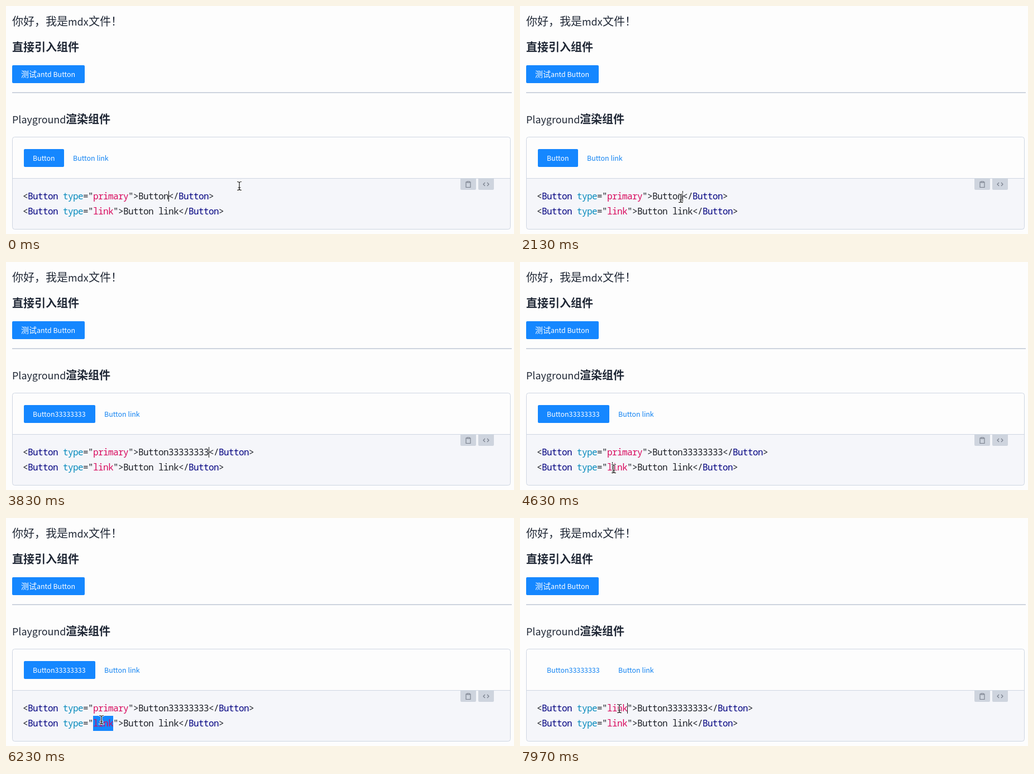
Animation of 910 by 408 pixels, one loop 8000 ms. Source, as an HTML page:

```html
<!DOCTYPE html>
<html lang="zh-CN">
<head>
<meta charset="utf-8">
<title>Playground</title>
<style>
  html, body { margin: 0; width: 100%; height: 100%; overflow: hidden; background: #fdfdfd; }
  svg { display: block; width: 910px; height: 408px; }
  text { font-family: "Noto Sans CJK SC", "Noto Sans CJK JP", "Noto Sans CJK", "Noto Sans", sans-serif; fill: #1f2735; white-space: pre; }
  .h { font-size: 20px; }
  .h .latin { font-size: 17.9px; }
  .b { font-weight: 700; }
  .s { font-size: 14px; font-weight: 500; }
  .s .latin, .s.latin { font-size: 12.4px; }
  .white { fill: #fff; }
  .link { fill: #1283f2; }
  .blue { fill: #1587ff; }
  .code, .code tspan { font: 16px "Noto Sans Mono", "Liberation Mono", monospace; letter-spacing: -.6px; }
  .code { fill: #1c1f26; }
  .tag { fill: #000080; }
  .attr { fill: #078bbd; }
  .str { fill: #d8085c; }
  .line { fill: none; stroke: #ced6e2; }
  .tool { fill: #ced4de; }
  .icon { fill: none; stroke: #747b88; stroke-width: 1.1; }
  .beam { fill: none; stroke-linecap: round; }
</style>
</head>
<body>
<svg viewBox="0 0 910 408">
  <defs>
    <path id="beam" d="M-3.5-7.5Q0-7.5 0-5.5Q0-7.5 3.5-7.5M0-5.5V5.5M-3.5 7.5Q0 7.5 0 5.5Q0 7.5 3.5 7.5M-2 3H2"/>
  </defs>
  <text class="h" y="35"><tspan x="11">你好，我是</tspan><tspan class="latin" x="111">mdx</tspan><tspan x="148">文件！</tspan></text>
  <text class="h b" x="11" y="81">直接引入组件</text>
  <rect class="blue" x="11" y="106" width="130" height="32" rx="2"/>
  <text class="s white" y="127"><tspan x="27">测试</tspan><tspan class="latin" x="55">antd Button</tspan></text>
  <rect x="11" y="154" width="895" height="2" fill="#ced4de"/>
  <text class="h" y="210"><tspan class="latin" x="11">Playground</tspan><tspan class="b" x="107">渲染组件</tspan></text>

  <path d="M12 308H903V396a4 4 0 0 1-4 4H16a4 4 0 0 1-4-4Z" fill="#f5f6fa"/>
  <rect class="line" x="11.5" y="234.5" width="892" height="165" rx="4"/>
  <path class="line" d="M12 308.5H903"/>
  <rect class="blue" id="button" x="32" y="256" height="32" rx="2"/>
  <text id="label" x="48" y="277"></text>
  <text class="s latin link" id="second" y="277">Button link</text>

  <path class="tool" d="M814 309h28v18a2 2 0 0 1-2 2h-24a2 2 0 0 1-2-2ZM846 309h28v18a2 2 0 0 1-2 2h-24a2 2 0 0 1-2-2Z"/>
  <path class="icon" d="M826 315h-2v9.5h8v-9.5h-2M826 314h4v2h-4Z"/>
  <path class="icon" d="M858 316l-3 3 3 3M862 316l3 3-3 3"/>

  <rect class="blue" id="selection" x="156" height="27"/>
  <text class="code" id="first-line" y="346"></text>
  <text class="code" id="second-line" y="373"></text>
  <rect id="caret" width="1" height="19" fill="#111"/>
  <g id="mouse">
    <circle id="press" r="11" fill="#c4302c" fill-opacity=".85"/>
    <use class="beam" href="#beam" stroke="#fff" stroke-width="3"/>
    <use class="beam" href="#beam" stroke="#111" stroke-width="1.2"/>
  </g>
</svg>
<script>
  const LOOP = 8000, CHAR = 9, CODE_X = 30, VALUE_X = 156;
  const TYPE_START = 2400, TYPE_STEP = 190, DIGITS = 8, MOUSE_BACK = 3950;
  const CLICK_LINK = 4500, SELECT_LINK = 4760, CLICK_PRIMARY = 6600, SELECT_PRIMARY = 6780, PASTE = 7500;
  const PRESS_TIME = 110;
  const PRESSES = [CLICK_LINK, SELECT_LINK, CLICK_PRIMARY, SELECT_PRIMARY];
  const PATH = [[0, 418, 322], [200, 418, 322], [1050, 288, 344], [MOUSE_BACK, 288, 344],
                [4420, 168, 370], [6050, 168, 370], [6550, 178, 341], [LOOP, 178, 341]];
  const $ = id => document.getElementById(id);
  const set = (id, attrs) => { for (const k in attrs) $(id).setAttribute(k, attrs[k]); };
  const show = (id, on) => set(id, { display: on ? "inline" : "none" });
  const between = (t, a, b) => t >= a && t < b;

  function codeLine(id, type, label) {
    const parts = [["", "<"], ["tag", "Button"], ["attr", " type"], ["", '="'], ["str", type],
                   ["", '">' + label + "</"], ["tag", "Button"], ["", ">"]];
    let column = 0;
    $(id).innerHTML = parts.map(([cls, s]) => {
      const x = CODE_X + CHAR * column;
      column += s.length;
      return `<tspan class="${cls}" x="${x}">${s.replace(/</g, "&lt;").replace(/>/g, "&gt;")}</tspan>`;
    }).join("");
  }

  function mouseAt(t) {
    const i = PATH.findIndex(p => p[0] > t);
    const [t0, x0, y0] = PATH[i - 1], [t1, x1, y1] = PATH[i];
    const u = (t - t0) / (t1 - t0), e = u * u * (3 - 2 * u);
    return [x0 + (x1 - x0) * e, y0 + (y1 - y0) * e];
  }

  let shown = "";
  function renderText(count, pasted) {
    const key = count + "," + pasted;
    if (key === shown) return;
    shown = key;
    const label = "Button" + "3".repeat(count);
    codeLine("first-line", pasted ? "link" : "primary", label);
    $("label").textContent = label;
    set("label", { class: "s latin " + (pasted ? "link" : "white") });
    set("button", { width: 72 + 7 * count });
    set("second", { x: 120 + 7 * count });
    show("button", !pasted);
  }

  function render(t) {
    const count = Math.max(0, Math.min(DIGITS, Math.floor((t - TYPE_START) / TYPE_STEP) + 1));
    const pasted = t >= PASTE;
    renderText(count, pasted);

    const onPrimary = between(t, SELECT_PRIMARY, PASTE);
    const onLink = between(t, SELECT_LINK, CLICK_PRIMARY);
    show("selection", onPrimary || onLink);
    set("selection", { y: onPrimary ? 327 : 354, width: CHAR * (onPrimary ? 7 : 4) });

    // The caret is solid right after a key or click, then blinks.
    let x = 291 + CHAR * count, y = 331, since = 0;
    if (pasted) { x = VALUE_X + 4 * CHAR; since = PASTE; }
    else if (t >= CLICK_PRIMARY) { x = VALUE_X + 2 * CHAR; since = CLICK_PRIMARY; }
    else if (t >= CLICK_LINK) { x = VALUE_X + CHAR; y = 358; since = CLICK_LINK; }
    else if (count) since = TYPE_START + TYPE_STEP * (count - 1);
    set("caret", { x, y });
    show("caret", !onPrimary && !onLink && (t - since) % 1000 < 500);

    set("mouse", { transform: `translate(${mouseAt(t).map(Math.round)})` });
    show("mouse", !between(t, TYPE_START, MOUSE_BACK));
    show("press", PRESSES.some(start => between(t, start, start + PRESS_TIME)));
  }

  codeLine("second-line", "link", "Button link");
  const start = performance.now();
  function frame() {
    render((performance.now() - start) % LOOP);
    requestAnimationFrame(frame);
  }
  frame();
</script>
</body>
</html>
```
